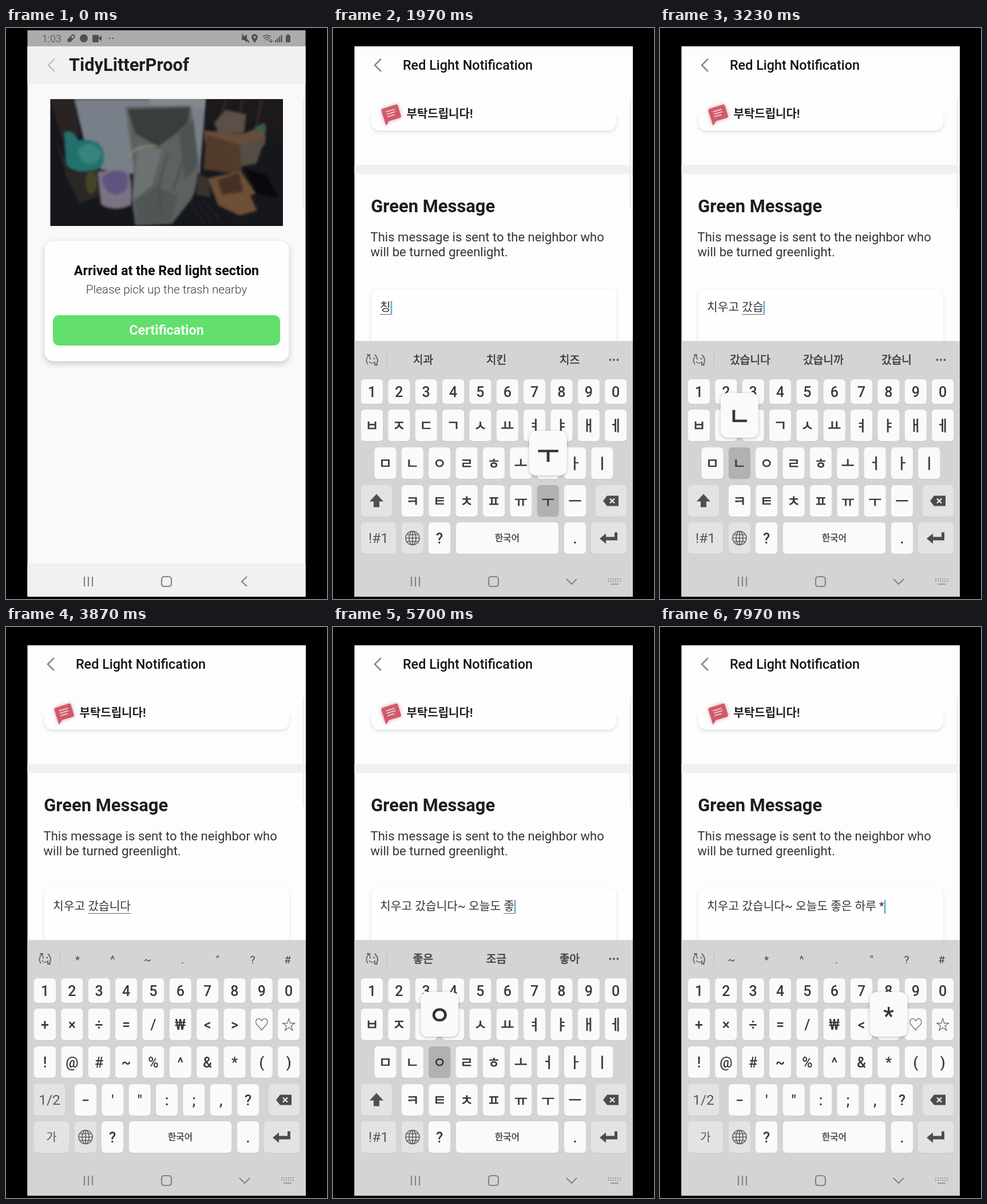
Write an HTML page with a canvas that moves like this. It is 561 by 998 pixels and loops after 8000 ms.

```html
<!DOCTYPE html>
<html lang="ko">
<head>
<meta charset="utf-8">
<title>Message typing</title>
<style>
html, body { margin: 0; width: 100%; height: 100%; overflow: hidden; background: #000; }
canvas { display: block; }
</style>
</head>
<body>
<canvas id="stage" width="561" height="998"></canvas>
<script>
const ctx = document.getElementById('stage').getContext('2d');
const LOOP = 8000, CUT = 1500, LAG = 60, HOLD = 75, POPUP = 150, BLINK = 300;
const FONT = 'Roboto, "Noto Sans CJK KR", sans-serif';
const HANGUL = /[ㄱ-ㅣ가-힣]/;
const PITCH = 47.35;

// [press time, key, word being composed]; keys without a word commit it
const steps = [
  [1600, 'ㅊ', 'ㅊ'], [1720, 'ㅣ', '치'], [1830, 'ㅇ', '칭'], [1940, 'ㅜ', '치우'],
  [2060, 'ㄱ', '치욱'], [2170, 'ㅗ', '치우고'], [2290, ' '],
  [2400, 'ㄱ', 'ㄱ'], [2520, 'ㅏ', '가'], [2650, 'shift'], [2870, 'ㅆ', '갔'],
  [2970, 'ㅅ', '갔ㅅ'], [3060, 'ㅡ', '갔스'], [3140, 'ㅂ', '갔습'], [3220, 'ㄴ', '갔습ㄴ'],
  [3310, 'ㅣ', '갔습니'], [3400, 'ㄷ', '갔습닏'], [3480, 'ㅏ', '갔습니다'],
  [3710, '!#1'], [4070, '~'], [4180, '가'], [4270, ' '],
  [4500, 'ㅇ', 'ㅇ'], [4600, 'ㅗ', '오'], [4690, 'ㄴ', '온'], [4780, 'ㅡ', '오느'],
  [4880, 'ㄹ', '오늘'], [5030, 'ㄷ', '오늘ㄷ'], [5140, 'ㅗ', '오늘도'], [5250, ' '],
  [5370, 'ㅈ', 'ㅈ'], [5480, 'ㅗ', '조'], [5590, 'ㅎ', '좋'], [5700, 'ㅇ', '좋ㅇ'],
  [5810, 'ㅡ', '좋으'], [5920, 'ㄴ', '좋은'], [6040, ' '],
  [6170, 'ㅎ', 'ㅎ'], [6290, 'ㅏ', '하'], [6420, 'ㄹ', '할'], [6520, 'ㅜ', '하루'],
  [6840, ' '], [7080, '!#1'], [7850, '*']
];
const modeKeys = { shift: 1, '!#1': 2, '가': 0 };

const hints = [
  [0, '오늘 제 하지만'], [1780, '치과 치킨 치즈'], [2000, '치우고 치우는 치우기'],
  [2230, '피우고 채우고 치루고'], [2580, '가서 가끔 같이'], [2930, '갔는데 갔다 갔어'],
  [3200, '갔습니다 갔습니까 갔습니'], [4240, '오늘도 하지만 제'], [4660, '오늘 오는 온도'],
  [4940, '오믈도 하지만 제'], [5200, '오늘도 하루도 모두'], [5540, '좋은 조금 좋아'],
  [5870, '좋은하루 좋은밤 좋은날'], [6480, '하루 하루도 하루의'], [6900, '되세요 보내세요 제']
];

function makeKeys(mode) {
  const keys = [];
  const row = (chars, x, y, h = 55) =>
    [...chars].forEach((label, i) => keys.push({ label, x: x + i * PITCH, y, w: 38, h }));
  const key = (label, x, y, w, fn) => keys.push({ label, x, y, w, h: 55, fn });
  const sym = mode === 2;
  row('1234567890', 49, 614, 43);
  row(['ㅂㅈㄷㄱㅅㅛㅕㅑㅐㅔ', 'ㅃㅉㄸㄲㅆㅛㅕㅑㅒㅖ', '+×÷=/₩<>♡☆'][mode], 49, 667);
  if (sym) row('!@#~%^&*()', 49, 733);
  else row('ㅁㄴㅇㄹㅎㅗㅓㅏㅣ', 72.5, 733);
  row(sym ? '−\'":;,?' : 'ㅋㅌㅊㅍㅠㅜㅡ', 120, 799);
  key(sym ? '1/2' : 'shift', 49, 799, 54, true);
  key('back', 459, 799, 54, true);
  key(sym ? '가' : '!#1', 49, 864, 61, true);
  key('globe', 120, 864, 38, true);
  key('?', 167, 864, 38);
  key(' ', 215, 864, 179);
  key('.', 404, 864, 38);
  key('enter', 451, 864, 62, true);
  return keys;
}
const layouts = [0, 1, 2].map(makeKeys);

function rect(x, y, w, h, color, r = 0) {
  ctx.fillStyle = color;
  ctx.beginPath();
  ctx.roundRect(x, y, w, h, r);
  ctx.fill();
}
function raised(x, y, w, h, color, r, blur, dy, alpha) {
  ctx.save();
  ctx.shadowColor = `rgba(0,0,0,${alpha})`;
  ctx.shadowBlur = blur;
  ctx.shadowOffsetY = dy;
  rect(x, y, w, h, color, r);
  ctx.restore();
}
function text(str, x, y, size, color, weight = 400, align = 'left') {
  ctx.font = `${weight} ${size}px ${FONT}`;
  ctx.fillStyle = ctx.strokeStyle = color;
  ctx.textAlign = align;
  ctx.fillText(str, x, y);
  // Hangul has no medium weight here, so thicken it with an outline
  if (weight === 500 && HANGUL.test(str)) {
    ctx.lineWidth = size * 0.03;
    ctx.strokeText(str, x, y);
  }
}
const centered = (str, x, y, size, color, weight) =>
  text(str, x, y + size * 0.36, size, color, weight, 'center');
function stroke(d, color, width = 2) {
  ctx.strokeStyle = color;
  ctx.lineWidth = width;
  ctx.stroke(new Path2D(d));
}
function fill(d, color) {
  ctx.fillStyle = color;
  ctx.fill(new Path2D(d));
}
function at(x, y, draw, angle = 0) {
  ctx.save();
  ctx.translate(x, y);
  ctx.rotate(angle);
  draw();
  ctx.restore();
}
const dot = (x, y, r, color) => rect(x - r, y - r, 2 * r, 2 * r, color, r);

function navBar(typing) {
  const c = '#858588';
  stroke('M137 959V976M144 959V976M151 959V976', c, 2.2);
  stroke('M276 959H284Q289 959 289 964V971Q289 976 284 976H276Q272 976 272 971V964Q272 959 276 959Z', c, 2.2);
  stroke(typing ? 'M408 963L417 972L426 963' : 'M421 959L412 967.5L421 976', c, 2.2);
  if (typing) {
    for (let i = 0; i < 12; i++) rect(481 + (i % 6) * 4, 962 + Math.floor(i / 6) * 4, 2, 2, '#99999b');
    rect(485, 971, 14, 2, '#99999b');
  }
}

function statusBar() {
  const c = '#505050';
  rect(37.5, 4, 486, 28, '#acacac');
  text('1:03', 63, 25, 17.5, '#686868');
  at(114, 18, () => { rect(-8, -3.5, 16, 7, c, 3.5); rect(1, -2, 5, 4, '#acacac', 2); }, -0.8);
  dot(136, 18, 7, c);
  rect(151, 12, 11, 13, c, 2);
  fill('M161 18L167 13V23Z', c);
  dot(181, 18, 1.3, c);
  dot(187, 18, 1.3, c);
  fill('M412 15H416L421 11V25L416 21H412Z', c);
  stroke('M412 11L425 25', c, 2);
  fill('M434.5 26Q429 19 429 16A5.5 5.5 0 0 1 440 16Q440 19 434.5 26Z', c);
  dot(434.5, 16, 2, '#acacac');
  stroke('M449 15Q456 10 463 15M451 18Q456 14.5 461 18M454 21Q456 19.5 459 21', c, 1.6);
  stroke('M463 19V25M460 22L463 25L466 22', c, 1.2);
  for (let i = 0; i < 4; i++) rect(470 + i * 3.5, 21 - i * 3, 2.2, 4 + i * 3, c);
  rect(489, 13, 8, 12, c, 1);
  rect(491, 11, 4, 3, c);
}

function photo() {
  ctx.save();
  ctx.beginPath();
  ctx.rect(77.5, 124.5, 406.5, 221.5);
  ctx.clip();
  rect(77, 124, 407, 222, '#1b1c22');
  ctx.filter = 'blur(2px)';
  fill('M77 124H120L128 190L98 192Z', '#342c29');
  fill('M119 124H350L338 255H170L137 200Z', '#9aa1ad');
  fill('M250 120H350L346 142L250 138Z', '#a5abb1');
  fill('M350 120H488V215L455 170L350 165Z', '#241e1f');
  stroke('M384 124L375 160M414 124L405 165M447 124L438 172', '#42332a', 4);
  fill('M90 202L112 250L174 248L180 288L128 307L105 260Z', '#34302e');
  fill('M101 183Q116 174 126 196Q172 192 171 226Q172 252 140 251Q100 252 104 225Z', '#2b8f89');
  fill('M126 212Q147 192 166 214Q168 236 146 238Q128 236 126 212Z', '#47a79d');
  fill('M141 254Q152 246 158 255Q163 289 147 290Q136 284 141 254Z', '#5a5431');
  fill('M160 251L214 246Q223 280 219 309Q192 323 166 309Z', '#9c91a4');
  fill('M168 262Q186 242 210 254Q222 285 193 291Q172 291 168 262Z', '#7769a3');
  fill('M209 138L323 136L338 247Q333 286 322 302L291 341L226 344L220 301L223 243Z', '#757c79');
  fill('M213 142L321 139L317 170L266 207L226 185Z', '#474d4b');
  fill('M230 207L272 212L256 274L222 301Z', '#8a928f');
  fill('M302 178L327 159L335 241L313 266Z', '#626966');
  fill('M226 302L262 276L300 294L288 341L228 344Z', '#656d6b');
  stroke('M212 226Q230 202 262 207', '#b6b382', 3);
  stroke('M282 221L266 280L273 326M313 223L292 283', '#5a625f', 3);
  fill('M364 166L383 143L420 151L416 185L371 186Z', '#73645a');
  fill('M345 179L415 185L454 168L452 205L407 215L349 201Z', '#82634a');
  fill('M350 186L416 207L411 257L345 247Z', '#674a35');
  fill('M408 207L454 188L438 237L411 242Z', '#6d6057');
  fill('M432 174L452 166L453 184Z', '#3a7463');
  fill('M335 253L354 264L358 296L332 291Z', '#494037');
  fill('M352 263L410 250L437 289L427 293L439 319L408 328L371 310Z', '#8a6443');
  fill('M370 266L407 253L414 286L378 291Z', '#553b2a');
  fill('M418 247L455 257L476 296L439 290Z', '#08090e');
  stroke('M323 307L346 340M333 304L360 338M345 302L373 334', '#30333a', 2);
  ctx.filter = 'none';
  rect(77, 124, 407, 222, 'rgba(6,7,12,.22)');
  ctx.restore();
}

function edgeHandle() {
  stroke('M523 121Q519.5 124 519.5 132V305Q519.5 313 523 317', '#e8e8ea', 1.5);
}

function arrivalScreen() {
  rect(37.5, 32, 486, 962, '#f9f9fa');
  statusBar();
  rect(37.5, 32, 486, 65, '#f1f1f1');
  stroke('M85 54L74 65L85 76', '#c3c3c5', 2.5);
  text('TidyLitterProof', 110, 75, 30.8, '#182023', 700);
  edgeHandle();
  photo();
  raised(67.5, 372, 427, 210.5, '#fefefe', 16, 12, 4, 0.2);
  text('Arrived at the Red light section', 280.5, 432, 23.3, '#080808', 700, 'center');
  text('Please pick up the trash nearby', 280.5, 464, 20.7, '#3c3c3e', 300, 'center');
  rect(82, 502, 397, 53, '#62df6c', 10);
  text('Certification', 280.5, 536, 23.4, '#f3fff3', 700, 'center');
  rect(37.5, 937, 486, 57, '#f1f1f1');
  rect(37.5, 937, 486, 1, '#e4e4e6');
  navBar(false);
}

function typedState(t) {
  const s = { done: '', word: '', mode: 0, last: CUT, press: null };
  for (const [time, key, word] of steps) {
    if (t >= time) s.press = { key, age: t - time };
    if (t < time + LAG) break;
    if (key in modeKeys) { s.mode = modeKeys[key]; continue; }
    s.last = time + LAG;
    if (word) s.word = word;
    else { s.done += s.word + key; s.word = ''; }
    if (s.mode === 1) s.mode = 0;
  }
  return s;
}

const icons = {
  shift() { fill('M0 -12L12 1H5V11H-5V1H-12Z', '#505052'); },
  back() {
    fill('M-14 0L-7 -9H13V9H-7Z', '#4c4c4e');
    stroke('M-2 -4L6 4M6 -4L-2 4', '#eee', 2.3);
  },
  globe() {
    stroke('M-12 0A12 12 0 1 0 12 0A12 12 0 1 0 -12 0M-6 0A6 12 0 1 0 6 0A6 12 0 1 0 -6 0M0 -12V12M-12 0H12M-10 -6H10M-10 6H10', '#606062', 1.6);
  },
  enter() { fill('M-16 1L-5 -8V-2H10V-10H15V4H-5V10Z', '#4c4c4e'); }
};

function drawKey(k, dark) {
  rect(k.x, k.y + 1, k.w, k.h, '#c9c9cb', 6);
  rect(k.x, k.y, k.w, k.h, dark ? '#b1b1b3' : k.fn ? '#e3e3e4' : '#fafafb', 6);
  const x = k.x + k.w / 2, y = k.y + k.h / 2;
  if (icons[k.label]) at(x, y, icons[k.label]);
  else if (k.label === ' ') centered('한국어', x, y, 15.5, '#454547', 500);
  else if (k.fn) centered(k.label, x, y, k.label === '가' ? 20 : 24.5, '#58585a');
  else centered(k.label, x, y, 25, '#39393b', 500);
}

function suggestions(t, mode) {
  const c = '#68686a';
  stroke('M63 571Q55 580 61 588M73 571Q82 580 75 589M59 571H64V576M78 589H73V584', c, 1.8);
  dot(65, 578, 1.4, c);
  dot(72, 578, 1.4, c);
  stroke('M63 583Q68.5 589 74 583', c, 1.6);
  rect(93.5, 568, 1, 24, '#b9b9bc');
  if (mode === 2) {
    const marks = t < 4130 ? '*^~."?#' : '~*^."?#';
    [...marks].forEach((m, i) => centered(m, 125 + i * 61.2, 581, 19, '#444446'));
    return;
  }
  const words = hints.filter(h => t >= h[0]).pop()[1].split(' ');
  words.forEach((w, i) => centered(w, 157.5 + i * 128, 580.5, 19.2, '#3c3c3e', 500));
  for (const x of [484.5, 491, 497.5]) dot(x, 580, 1.9, '#5a5a5c');
}

function keyboard(t, { mode, press }) {
  rect(37.5, 547, 486.5, 447, '#d4d4d5');
  suggestions(t, mode);
  for (const k of layouts[mode]) drawKey(k, press && press.key === k.label && press.age < HOLD);
  navBar(true);
  if (!press || press.age >= POPUP || press.key === ' ' || press.key in modeKeys) return;
  const k = layouts.flat().find(key => key.label === press.key);
  const x = k.x + k.w / 2;
  raised(x - 33, k.y - 95, 66, 78, '#fafafb', 12, 5, 1, 0.25);
  centered(k.label, x, k.y - 54.5, 42, '#333335', 500);
}

function chatIcon() {
  ctx.shadowColor = 'rgba(205,75,95,.6)';
  ctx.shadowBlur = 6;
  fill('M-12 -13H12Q15 -13 15 -10V8Q15 11 12 11H-8L-15 17V-10Q-15 -13 -12 -13Z', '#d05a6b');
  ctx.shadowColor = 'transparent';
  stroke('M-8 -6H8M-8 -1.5H8M-8 3H5', '#f1ccd1', 1.8);
}

function messageScreen(t) {
  const s = typedState(t);
  rect(37.5, 32, 486.5, 962, '#fdfdfd');
  raised(67, 110, 428, 69, '#fefefe', 14, 6, 3, 0.11);
  rect(40, 100, 478, 54, '#fdfdfd');
  edgeHandle();
  stroke('M84 54L73 65L84 76', '#89898b', 2.6);
  text('Red Light Notification', 122, 72.5, 23.4, '#151517', 500);
  at(102, 150, chatIcon, -0.3);
  text('부탁드립니다!', 128.5, 157, 20, '#202022', 700);
  rect(37.5, 239, 486.5, 16, '#f0f0f1');
  text('Green Message', 66.3, 322, 30.9, '#1d1d1f', 700);
  text('This message is sent to the neighbor who', 65.5, 373, 22.1, '#353537');
  text('will be turned greenlight.', 65.5, 399, 22.1, '#353537');
  raised(67, 457, 428, 130, '#fefefe', 10, 6, 2, 0.11);

  text(s.done, 82, 495, 20.35, '#333335');
  const start = 82 + ctx.measureText(s.done).width;
  text(s.word, start, 495, 20.35, '#333335');
  const width = ctx.measureText(s.word).width;
  if (s.word) rect(start, 500, width, 1.2, '#77777a');
  if ((t - s.last) % (2 * BLINK) < BLINK) rect(start + width, 477, 2.6, 24, '#62b2d8');
  keyboard(t, s);
}

function frame(now) {
  const t = now % LOOP;
  rect(0, 0, 561, 998, '#000');
  if (t < CUT) arrivalScreen();
  else messageScreen(t);
  requestAnimationFrame(frame);
}
requestAnimationFrame(frame);
</script>
</body>
</html>
```
